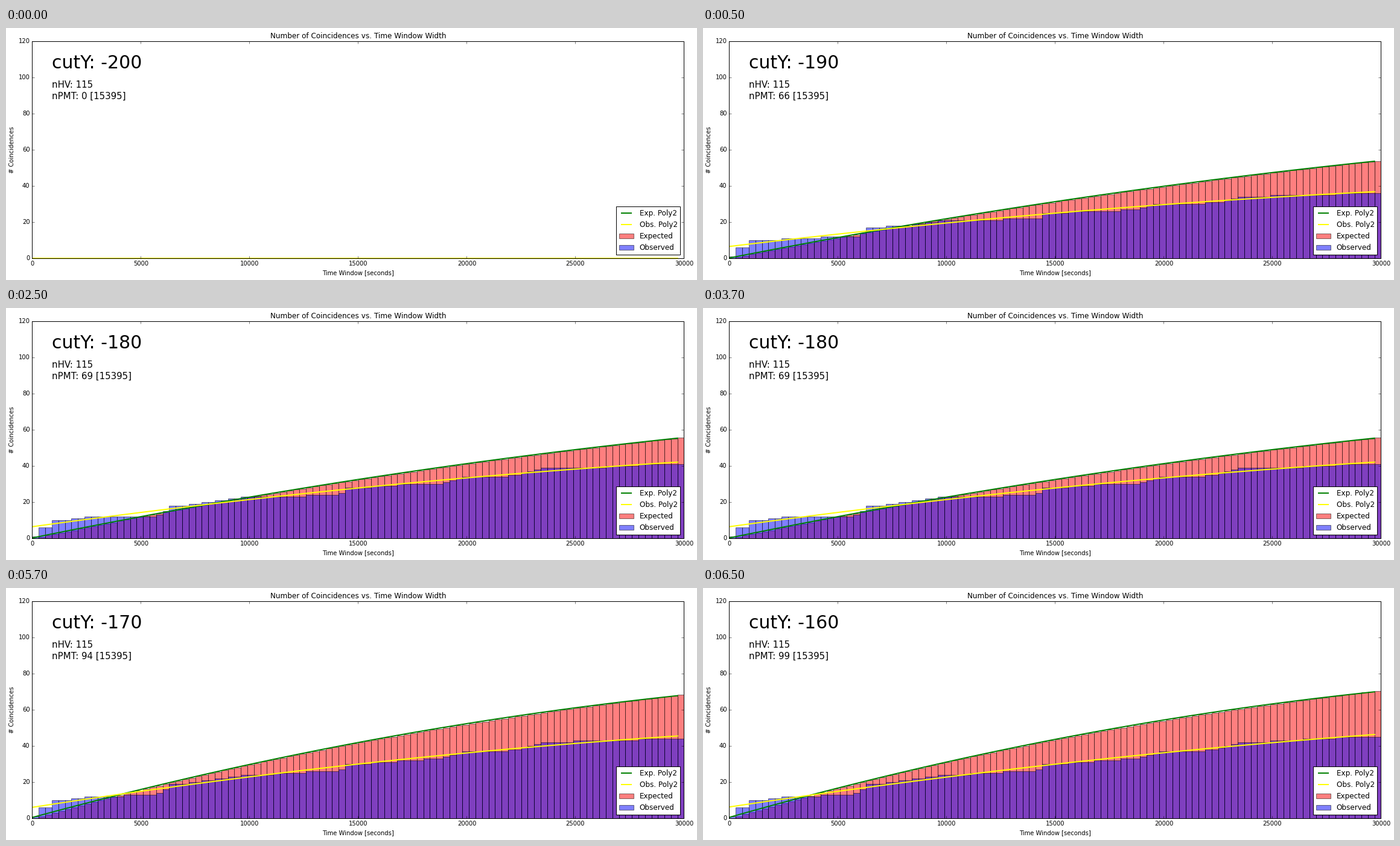
A matplotlib script that plays this animation: 1145 by 418 pixels, repeating every 8000 ms.

```python
import numpy as np
import matplotlib.pyplot as plt
from matplotlib.animation import FuncAnimation

W, H, DPI = 1145, 418, 72
plt.style.use("classic")
plt.rcParams.update({
    "font.family": "DejaVu Sans",
    "font.size": 10,
    "savefig.dpi": "figure",
    "figure.facecolor": "white",
})

STEP = 300           # seconds per bar
SPAN = 3.12e6        # length of the run in seconds
N_HV, N_ALL = 115, 15395
index = np.arange(100)
windows = 1 + index * STEP

# (cutY, nPMT, coincidences lost per bar against the loosest cut)
CUTS = [(-200, 0, 0), (-190, 66, 0.1), (-180, 69, 0.043),
        (-170, 94, 0.006), (-160, 99, 0)]

# Bends of the observed curve for the loosest cut
BENDS = [(0, 1), (1, 6), (2, 6), (3, 10), (8, 12), (19, 14), (21, 19), (32, 24),
         (47, 27), (48, 30), (63, 34), (66, 37), (73, 38), (78, 42), (93, 45)]


def expected(n_pmt):
    return N_HV * (1 - (1 - windows / SPAN) ** n_pmt)


def observed(n_pmt, loss):
    if n_pmt == 0:
        return np.zeros(len(index))
    counts = np.floor(np.interp(index, *zip(*BENDS)) + 1e-9)
    return np.maximum.accumulate(counts - np.round(loss * index))


def poly2(y):
    return np.polyval(np.polyfit(windows, y, 2), windows)


fig = plt.figure(figsize=(W / DPI, H / DPI), dpi=DPI)
ax = fig.add_axes([43.48 / W, 36 / H, 1080 / W, 360 / H])


def bars(color, label):
    return ax.bar(windows, 0 * windows, STEP, align="edge", color=color,
                  edgecolor="black", alpha=0.5, label=label)


def curve(color, label):
    return ax.plot(windows, 0 * windows, color=color, lw=2, label=label)[0]


def note(y, size):
    return ax.text(0.03, y, "", size=size, transform=ax.transAxes)


exp_bars, obs_bars = bars("red", "Expected"), bars("blue", "Observed")
exp_line, obs_line = curve("green", "Exp. Poly2"), curve("yellow", "Obs. Poly2")
ax.set(xlim=(0, 30000), ylim=(0, 120),
       xlabel="Time Window [seconds]", ylabel="# Coincidences",
       title="Number of Coincidences vs. Time Window Width")
ax.legend(handles=[exp_line, obs_line, exp_bars, obs_bars], loc="lower right")

cut_note = note(315 / 360, 30)
hv_note = note(283 / 360, 15)
pmt_note = note(264 / 360, 15)


def show(rects, line, y):
    for rect, h in zip(rects, y):
        rect.set_height(h)
    line.set_ydata(poly2(y))


def update(frame):
    # The first cut shows for one tick, each later one for four
    cut, n_pmt, loss = CUTS[(frame + 3) // 4]
    show(exp_bars, exp_line, expected(n_pmt))
    show(obs_bars, obs_line, observed(n_pmt, loss))
    cut_note.set_text(f"cutY: {cut}")
    hv_note.set_text(f"nHV: {N_HV}")
    pmt_note.set_text(f"nPMT: {n_pmt} [{N_ALL}]")
    return []


anim = FuncAnimation(fig, update, frames=16, interval=500, repeat=True)
plt.show()
```
